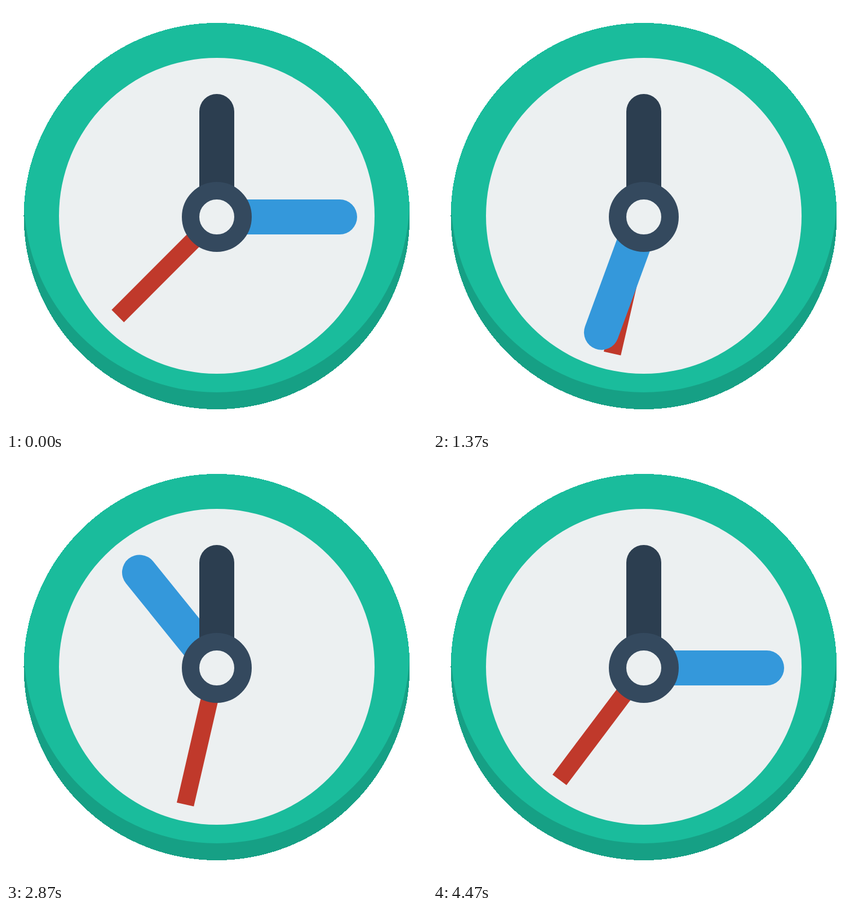
An HTML page for the animation above (4.51 s loop, 747 px wide and 750 px high).

```html
<!DOCTYPE html>
<html lang="en">
<head>
<meta charset="utf-8">
<title>Clock</title>
<style>
  html, body { margin: 0; height: 100%; overflow: hidden; background: #fff; }
  svg { display: block; width: 100%; height: 100%; }
</style>
</head>
<body>
<svg viewBox="0 0 747 750">
  <!-- rim: the white surround trims it to a hard-edged disc -->
  <rect width="747" height="750" fill="#16a085"/>
  <circle cx="374" cy="343" r="342" fill="#1abc9c"/>
  <circle cx="374" cy="372.5" r="442.5" fill="none" stroke="#fff" stroke-width="200" shape-rendering="crispEdges"/>
  <circle cx="374" cy="372" r="280" fill="#ecf0f1"/>

  <!-- hands point to twelve and are turned by the script -->
  <g transform="translate(374 374)">
    <path id="second" d="M0 0V-248.5" stroke="#c0392b" stroke-width="31"/>
    <path id="minute" d="M0 0V-218" stroke="#3498db" stroke-width="62" stroke-linecap="round"/>
    <path id="hour" d="M0 0V-187" stroke="#2c3e50" stroke-width="62" stroke-linecap="round"/>
    <circle r="46.5" fill="#ecf0f1" stroke="#34495e" stroke-width="31"/>
  </g>
</svg>
<script>
  const LOOP = 4510, LAST = 134;

  const turn = (id, angle) =>
    document.getElementById(id).setAttribute("transform", `rotate(${angle})`);

  // 30 steps per second, on a 10 ms clock
  const stepAt = ms => Math.min(LAST, Math.floor((Math.floor(ms / 10) + 0.5) * 0.3));

  // The hour hand swings out to 10 degrees and back
  const hourAngle = step =>
    10 * Math.max(0, Math.min((step - 90) / 24, (LAST - step) / 20));

  function draw() {
    const step = stepAt(performance.now() % LOOP);
    turn("second", 225 + 8 * step);
    turn("minute", 90 + 360 * step / LAST);
    turn("hour", hourAngle(step));
    requestAnimationFrame(draw);
  }
  draw();
</script>
</body>
</html>
```
